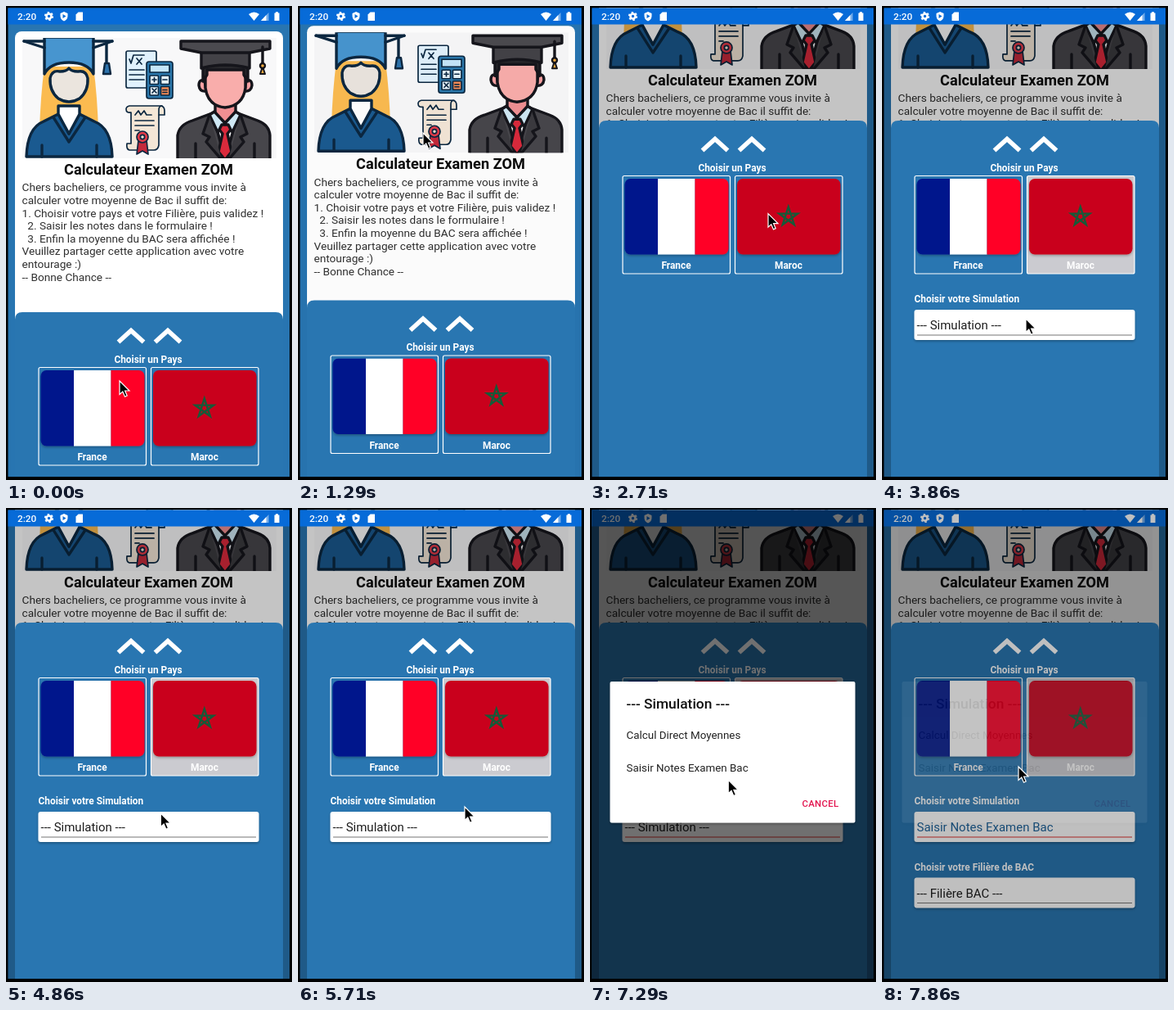
An HTML page that plays this animation: 350x579 px, repeating every 8 s.

```html
<!DOCTYPE html>
<html lang="fr">
<head>
<meta charset="utf-8">
<title>Calculateur Examen ZOM</title>
<style>
  html, body { margin: 0; width: 100%; height: 100%; overflow: hidden; background: #000; }
  svg { display: block; width: 100%; height: 100%; }
  text { font-family: Roboto, "Open Sans", sans-serif; white-space: pre; }
  .label { font-size: 11.9px; font-weight: 700; fill: #fff; }
  .mid { text-anchor: middle; }
  .field { font-size: 15px; fill: #1d1d1d; }
  .item { font-size: 13.4px; fill: #222; }
  .body { font-size: 13.65px; fill: #303030; }
  .ink { stroke: #0b2740; stroke-width: 3.4; stroke-linejoin: round; stroke-linecap: round; }
  .thin { stroke-width: 1.7; }
  .dark { stroke: #15151b; }
  .line { fill: none; }
</style>
</head>
<body>
<svg viewBox="0 0 350 579">
  <defs>
    <clipPath id="screen"><rect x="2.5" y="2.5" width="344.5" height="572.5"/></clipPath>
    <clipPath id="picture"><rect x="20" y="39" width="311" height="147"/></clipPath>
    <clipPath id="flagA"><rect x="42.5" y="71" width="127" height="92.5" rx="7"/></clipPath>
    <filter id="shadow" x="-10%" y="-10%" width="120%" height="130%">
      <feDropShadow dx="0" dy="1.5" stdDeviation="1.5" flood-opacity=".3"/>
    </filter>
  </defs>
  <rect width="350" height="579"/>
  <g clip-path="url(#screen)">
    <rect width="350" height="579" fill="#2875b1"/>

    <g id="card">
      <rect x="11" y="31" width="328" height="700" rx="8" fill="#fff"/>
      <g clip-path="url(#picture)">
        <rect x="20" y="39" width="311" height="147" fill="#f8f8f9"/>

        <g class="ink">
          <path fill="#fbbb50" stroke="none" d="M47 74Q42 112 41 153H113Q112 112 107 74Z"/>
          <path fill="#1a5a90" d="M25 184Q26 149 46 141L64 132L77 156L90 132L108 141Q129 149 130 184Z"/>
          <path fill="#fff" d="M64 122V132L77 156L90 132V122Z"/>
          <path class="line" d="M58 136L77 166L97 136M44 170V184M111 170V184"/>
          <path fill="#ebe5de" d="M54 88Q56 78 66 80Q74 80 77 76Q80 80 88 80Q98 78 100 88Q101 104 90 113Q77 121 64 113Q53 104 54 88Z"/>
          <path fill="#4795cf" d="M47 38H107V83Q100 69 77 69Q54 69 47 83Z"/>
          <path fill="#4795cf" d="M22 43L47 51M107 51L130 43"/>
          <path class="line" d="M22 43H47M107 43H130M123 45V69"/>
          <path fill="#2d73ac" stroke-width="2.4" d="M121 70H126L128 83H119Z"/>
        </g>

        <g class="ink thin">
          <rect fill="#e0f1fc" x="147" y="55" width="37" height="45" rx="2"/>
          <path class="line" d="M151 65L153 70L156 60H169M160 64L166 71M166 64L160 71M151 78H169M151 84H169M151 90H169"/>
          <rect fill="#2b78ac" x="172" y="68" width="32" height="45" rx="3"/>
          <rect fill="#c5e6fa" x="176" y="72" width="24" height="9"/>
          <g fill="#e6f3fb">
            <rect x="176" y="85" width="10.5" height="10.5" rx="1"/>
            <rect x="189.5" y="85" width="10.5" height="10.5" rx="1"/>
            <rect x="176" y="98.5" width="10.5" height="10.5" rx="1"/>
            <rect x="189.5" y="98.5" width="10.5" height="10.5" rx="1" fill="#f28a55"/>
          </g>
          <path class="line" d="M179 90H184M181.5 87.5V92.5M192 90H197M179 101L184 106M184 101L179 106M192 102.5H197M192 105.5H197"/>
          <path fill="#f3e6d6" d="M151 122H190Q194 123 194 128V133H187V170Q186 176 181 176H151Q147 175 148 168H153V130Q147 131 147 126Q147 123 151 122Z"/>
          <path class="line" d="M187 133V127Q187 122 191 122M158 133L162 128L165 133L169 128L172 133H178M158 140H181M158 146H181M158 152H163"/>
          <path fill="#c4293a" d="M162 164L160 181L167 177L174 181L172 164Z"/>
          <circle fill="#e33b48" cx="167" cy="160" r="7"/>
          <circle fill="#f9dfd0" cx="167" cy="160" r="2.6"/>
        </g>

        <g class="ink dark">
          <path fill="#47464b" d="M210 188V158Q212 145 228 140L252 131H284L308 140Q322 145 323 158V188Z"/>
          <path fill="#f6f6f8" d="M253 131L268 188L284 131Z"/>
          <path fill="#f08f92" d="M256 112V131L268 143L281 131V112Z"/>
          <path fill="#cfe8f4" d="M255 129L268 143L259 154L249 133ZM281 129L268 143L277 154L287 133Z"/>
          <path fill="#d92a3c" d="M264 145H272L275 151L271 156L276 178L268 188L260 178L265 156L261 151Z"/>
          <path fill="#3b3a3f" d="M249 133L241 156L249 160L245 166L264 188M287 133L295 156L287 160L291 166L272 188"/>
          <path class="line" d="M232 168V188M304 168V188"/>
          <path fill="#f7a0a2" d="M243 91Q236 89 236 97Q237 105 245 104ZM294 91Q301 89 301 97Q300 105 292 104Z"/>
          <path fill="#f9adab" d="M244 74H293V100Q290 122 268 124Q247 122 244 100Z"/>
          <path fill="#28282c" d="M241 72H296V92L291 84V78H246V84L241 92Z"/>
          <path fill="#434247" d="M239 55H298V76Q268 68 239 76Z"/>
          <path fill="#4b4a4f" d="M214 43H323V52L298 57H239L214 52Z"/>
          <path class="line" d="M314 50V70"/>
          <circle fill="#f2aa3f" stroke-width="2.4" cx="314" cy="73" r="3"/>
          <path fill="#f2aa3f" stroke-width="2" d="M313 77H315L317 83H311Z"/>
        </g>
      </g>
      <text class="mid" x="174.5" y="206" font-size="18.2" font-weight="700" fill="#0b0b0b">Calculateur Examen ZOM</text>
      <g id="intro"></g>
    </g>
    <rect id="shade" width="350" height="579"/>

    <g id="panel">
      <path fill="#2976b1" d="M11 600V9Q11 0 20 0H330Q339 0 339 9V600Z"/>
      <path fill="none" stroke="#fff" stroke-width="5.6" d="M137.5 36.5L153 22.5L168.5 36.5M182.5 36.5L198 22.5L213.5 36.5"/>
      <text class="label mid" x="174" y="61.8">Choisir un Pays</text>
      <rect x="40" y="67.5" width="131.5" height="119.5" rx="2" fill="none" stroke="#fff" stroke-width="1.2"/>
      <rect id="cellB" x="177.5" y="67.5" width="131.5" height="119.5" rx="2" fill="none" stroke="#fff" stroke-width="1.2"/>
      <g filter="url(#shadow)">
        <g clip-path="url(#flagA)">
          <rect x="42" y="71" width="41" height="93" fill="#00148c"/>
          <rect x="83" y="71" width="45.5" height="93" fill="#fff"/>
          <rect x="128.5" y="71" width="42" height="93" fill="#ff0026"/>
        </g>
        <rect x="180" y="71" width="126.5" height="92.5" rx="7" fill="#c9001c"/>
      </g>
      <polygon id="star" fill="none" stroke="#165a38" stroke-width="2.4"/>
      <text class="label mid" x="105.5" y="181">France</text>
      <text class="label mid" x="243" y="181">Maroc</text>
      <g id="simulation">
        <text class="label" x="39.5" y="222.3">Choisir votre Simulation</text>
        <rect x="39.5" y="231" width="270" height="37" rx="3" fill="#fff" filter="url(#shadow)"/>
        <text id="choice" class="field" x="42.5" y="255.3">--- Simulation ---</text>
        <path id="underline" stroke-width="1.2" d="M43 262H306"/>
      </g>
      <g id="branch">
        <text class="label" x="39.5" y="303">Choisir votre Filière de BAC</text>
        <rect x="39.5" y="311.5" width="270" height="37" rx="3" fill="#fff" filter="url(#shadow)"/>
        <text class="field" x="42.5" y="336">--- Filière BAC ---</text>
        <path stroke="#777" stroke-width="1.2" d="M43 342.5H306"/>
      </g>
    </g>

    <rect width="350" height="22.5" fill="#076bd8"/>
    <g fill="#fff">
      <text x="14" y="17" font-size="11.8" font-weight="500">2:20</text>
      <circle cx="52.5" cy="12.5" r="3" fill="none" stroke="#fff" stroke-width="2.6"/>
      <circle cx="52.5" cy="12.5" r="4.7" fill="none" stroke="#fff" stroke-width="1.8" stroke-dasharray="2.4 2.52"/>
      <path d="M71 7L75.5 9V12.5Q75 17 71 18.5Q67 17 66.5 12.5V9Z"/>
      <path fill="#076bd8" d="M69.5 10V15L73.5 12.5Z"/>
      <path d="M88.5 7.5H94V18H85.5V10.5Z"/>
      <path d="M297 10Q303.5 5 310 10L303.5 18Z"/>
      <path d="M312 18L321.5 8V18Z" opacity=".45"/>
      <path d="M312 18L318.5 11V18Z"/>
      <path d="M328.5 8.5H330V7.3H333V8.5H334.5V18H328.5Z"/>
    </g>

    <rect id="dim" width="350" height="579"/>
    <g id="dialog">
      <rect x="24.5" y="212" width="300" height="172.5" rx="2" fill="#fff" filter="url(#shadow)"/>
      <text x="44.5" y="245" font-size="17.4" font-weight="500" fill="#111">--- Simulation ---</text>
      <text class="item" x="44.5" y="282">Calcul Direct Moyennes</text>
      <text class="item" x="44.5" y="322">Saisir Notes Examen Bac</text>
      <text x="259.5" y="365" font-size="11.4" font-weight="500" letter-spacing=".3" fill="#e3144f">CANCEL</text>
    </g>
    <path id="cursor" d="M0 0V16.5L3.8 13L6.5 19.2L9.2 18L6.6 12H12Z" stroke="#fff" stroke-width="1.2"/>
  </g>
</svg>
<script>
const $ = id => document.getElementById(id);
const LOOP = 8000, RATE = 7;          // pictures per second
const PANEL_TOP = 374, FULL_SCROLL = 234, PARALLAX = 0.466;

// Rows: [tick, value...], joined by straight lines.
const scrollKeys = [[0, 0], [6, 0], [9, 14.5], [10, 80], [11, 180], [12, 220], [13, 229], [15, 234]];
const cursorKeys = [
  [0, 139, 458], [2, 143, 440], [5, 150, 395], [7, 153, 250], [9, 153, 155], [12, 165, 197],
  [16, 190, 225], [17, 190, 225], [20, 232, 268], [23, 232, 275], [27, 176, 382],
  [30, 182, 377], [31, 182, 377], [40, 204, 365], [43, 186, 385], [46, 184, 387],
  [48, 182, 375], [52, 165, 318], [55, 167, 316]
];
const dialogKeys = [[44, 0], [45, .4], [46, .86], [47, 1], [54, 1], [55, .07]];
const dimKeys = [[44, 0], [45, .1], [46, .25], [48, .56], [54, .56], [55, .25]];
const PICKED = 22, FOCUSED = 45, CHOSEN = 55;

function sample(keys, tick) {
  const next = keys.findIndex(row => row[0] > tick);
  if (next < 0) return keys[keys.length - 1].slice(1);
  const a = keys[next - 1], b = keys[next];
  const u = (tick - a[0]) / (b[0] - a[0]);
  return a.slice(1).map((v, i) => v + (b[i + 1] - v) * u);
}
const level = (keys, tick) => sample([[0, 0], ...keys], tick)[0];

const intro = [
  "Chers bacheliers, ce programme vous invite à",
  "calculer votre moyenne de Bac il suffit de:",
  "1. Choisir votre pays et votre Filière, puis validez !",
  "  2. Saisir les notes dans le formulaire !",
  "  3. Enfin la moyenne du BAC sera affichée !",
  "Veuillez partager cette application avec votre",
  "entourage :)",
  "-- Bonne Chance --"
];
$("intro").innerHTML = intro.map((line, i) =>
  `<text class="body" x="19.5" y="${226.3 + i * 15.6}">${line}</text>`).join("");

$("star").setAttribute("points", [0, 2, 4, 1, 3].map(i => {
  const a = i * Math.PI * 2 / 5 - Math.PI / 2;
  return `${242.8 + 12 * Math.cos(a)},${117.3 + 12 * Math.sin(a)}`;
}).join(" "));

const move = (id, x, y) => $(id).setAttribute("transform", `translate(${x} ${y})`);
const show = (id, on) => $(id).setAttribute("visibility", on ? "visible" : "hidden");
const fade = (id, alpha) => $(id).setAttribute("opacity", alpha);

function draw(tick) {
  const scroll = level(scrollKeys, tick);
  move("card", 0, -scroll * PARALLAX);
  move("panel", 0, PANEL_TOP - scroll);
  fade("shade", .23 * scroll / FULL_SCROLL);

  $("cellB").setAttribute("fill", tick >= PICKED ? "#cbcbd0" : "none");
  show("simulation", tick > PICKED);
  show("branch", tick >= CHOSEN);
  $("underline").setAttribute("stroke", tick >= FOCUSED ? "#e0322e" : "#777");
  $("choice").textContent = tick >= CHOSEN ? "Saisir Notes Examen Bac" : "--- Simulation ---";
  $("choice").style.fill = tick >= CHOSEN ? "#1f649c" : "";

  fade("dim", level(dimKeys, tick));
  fade("dialog", level(dialogKeys, tick));
  move("cursor", ...sample(cursorKeys, tick));
}

const start = performance.now();
function frame() {
  const time = (performance.now() - start) % LOOP;
  draw(Math.min(55, Math.floor((time + 5) * RATE / 1000)));
  requestAnimationFrame(frame);
}
frame();
</script>
</body>
</html>
```
